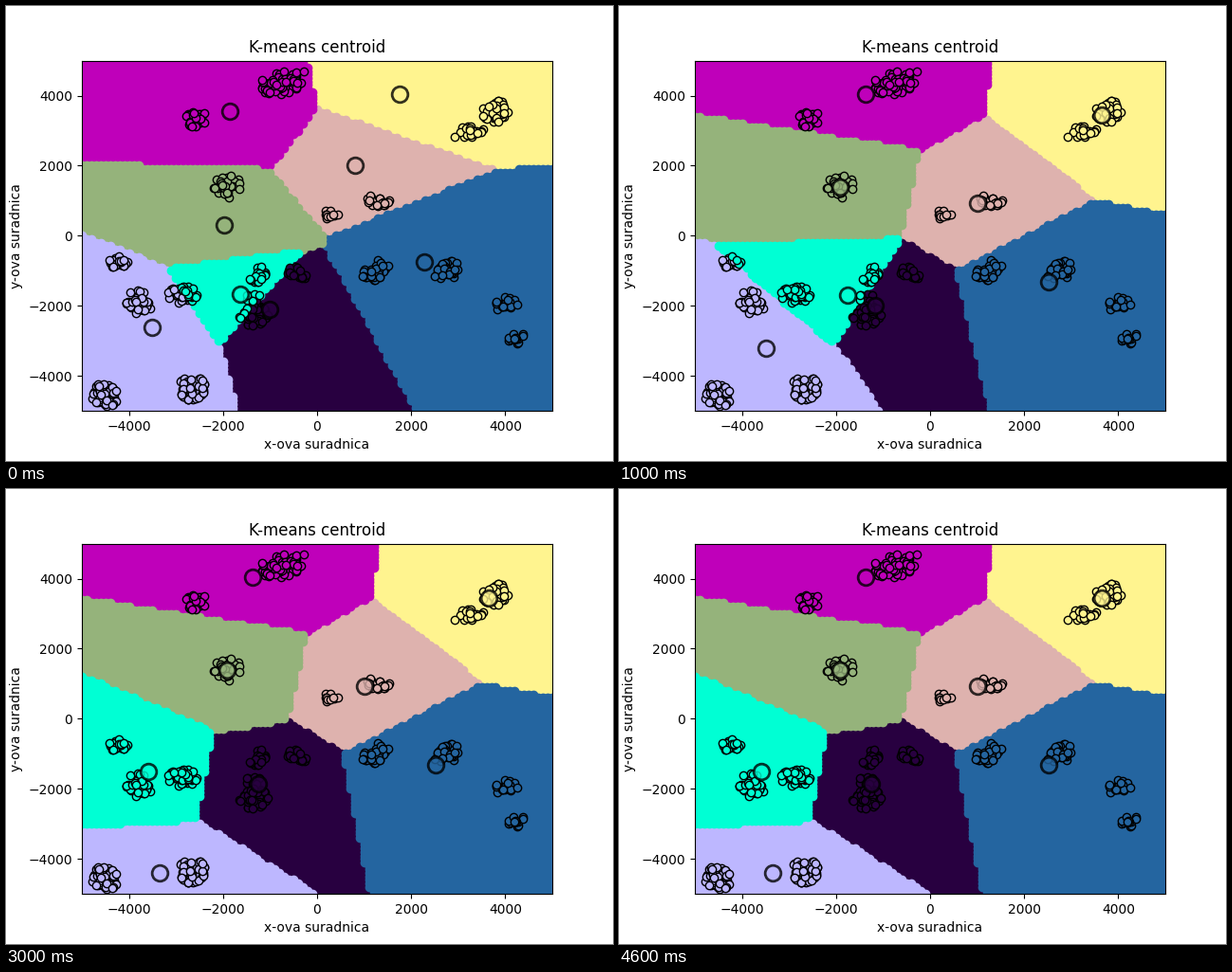
Write a matplotlib script that moves like this. It is 640 px wide and 480 px high and loops after 5000 ms.

```python
import numpy as np
import matplotlib.pyplot as plt
from matplotlib.animation import FuncAnimation

LIMIT = 5000
rng = np.random.default_rng(7)

# Later colours are painted over earlier ones.
COLORS = {
    "yellow": "#fff48f",
    "pink": "#deb2ae",
    "dark": "#280040",
    "blue": "#2465a0",
    "magenta": "#bf00ba",
    "green": "#95b37b",
    "lavender": "#bdb7ff",
    "teal": "#00ffd4",
}

START = {
    "yellow": (1744, 4042),
    "pink": (806, 2013),
    "dark": (-998, -2100),
    "blue": (2278, -747),
    "magenta": (-1845, 3542),
    "green": (-1976, 308),
    "lavender": (-3508, -2614),
    "teal": (-1633, -1680),
}

# Centroids that move in each iteration.
MOVES = [
    {
        "yellow": (3649, 3460),
        "pink": (1018, 944),
        "dark": (-1179, -1978),
        "blue": (2530, -1315),
        "magenta": (-1361, 4042),
        "green": (-1915, 1404),
        "lavender": (-3488, -3209),
        "teal": (-1754, -1694),
    },
    {"dark": (-1250, -1924), "lavender": (-3538, -3452), "teal": (-2641, -1531)},
    {"dark": (-1260, -1856), "lavender": (-3337, -4386), "teal": (-3579, -1504)},
    {"lavender": (-3340, -4396), "teal": (-3579, -1514)},
]

# Centre x, y, half width, half height, tilt, count.
BLOBS = [
    (-740, 4370, 440, 310, 0.25, 90),
    (-2580, 3350, 220, 230, 0, 35),
    (-1910, 1400, 300, 310, 0, 40),
    (3780, 3560, 270, 310, 0, 42),
    (3270, 3010, 260, 210, 0.2, 22),
    (1300, 1060, 240, 210, 0, 22),
    (280, 620, 170, 140, 0, 12),
    (1250, -970, 290, 270, 0.5, 45),
    (2730, -970, 300, 260, 0.1, 36),
    (4020, -1980, 230, 230, 0, 20),
    (4240, -2920, 190, 160, 0, 14),
    (-4260, -730, 230, 160, 0, 26),
    (-3800, -1900, 270, 330, -0.2, 42),
    (-2870, -1670, 310, 250, 0, 42),
    (-1230, -1090, 220, 210, 0.3, 25),
    (-480, -1020, 250, 140, -0.5, 26),
    (-1360, -2110, 330, 440, 0, 55),
    (-4520, -4540, 280, 310, -0.2, 60),
    (-2670, -4330, 270, 340, 0, 52),
]

STRAYS = [(-285, 4690), (2915, 2820), (-1165, 4440), (-4350, -4840)]


def blob(x, y, w, h, tilt, n):
    p = rng.normal(0, 0.55, (n, 2))
    p /= np.maximum(1, np.hypot(p[:, 0], p[:, 1]))[:, None]
    dx = p[:, 0] * w
    return np.column_stack([x + dx, y + p[:, 1] * h + tilt * dx])


def iterations():
    state = dict(START)
    steps = [state]
    for move in MOVES:
        state = {**state, **move}
        steps.append(state)
    return [np.array([s[name] for name in COLORS], float) for s in steps]


def nearest(points, centers):
    gap = points[:, None, :] - centers[None, :, :]
    return (gap ** 2).sum(axis=2).argmin(axis=1)


ticks = np.arange(-LIMIT, LIMIT + 1, 100)
grid = np.array([(x, y) for x in ticks for y in ticks], float)
data = np.vstack([blob(*b) for b in BLOBS] + [STRAYS])
steps = iterations()

fig, ax = plt.subplots(figsize=(6.4, 4.8), dpi=100)
ax.set_xlim(-LIMIT, LIMIT)
ax.set_ylim(-LIMIT, LIMIT)
ax.set_title("K-means centroid")
ax.set_xlabel("x-ova suradnica")
ax.set_ylabel("y-ova suradnica")


def layer(edge=None, **style):
    return [
        ax.plot([], [], "o", color=c, markeredgecolor=edge or c, **style)[0]
        for c in COLORS.values()
    ]


regions = layer()
dots = layer("black")
marks = layer("black", markersize=12, markeredgewidth=2, alpha=0.8)


def update(i):
    centers = steps[i]
    for points, lines in ((grid, regions), (data, dots)):
        owner = nearest(points, centers)
        for k, line in enumerate(lines):
            line.set_data(*points[owner == k].T)
    for mark, (x, y) in zip(marks, centers):
        mark.set_data([x], [y])
    return regions + dots + marks


anim = FuncAnimation(fig, update, frames=len(steps), interval=1000, repeat=True)
plt.show()
```
